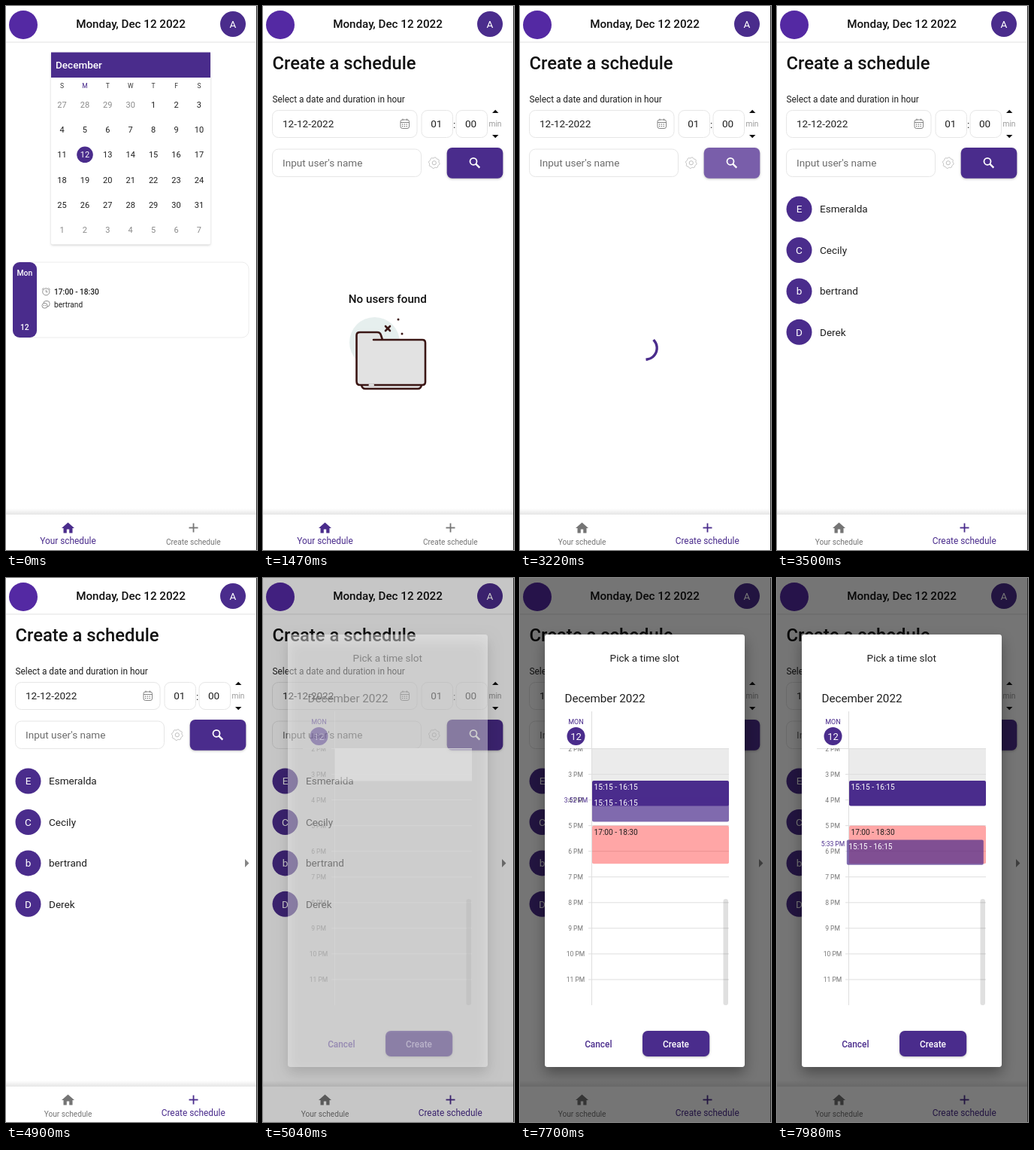
These frames come from a looping animation (334 px wide and 722 px high, 8 s). An HTML page with a canvas:

```html
<!DOCTYPE html>
<html lang="en">
<head>
<meta charset="utf-8">
<title>Schedule app</title>
<style>
html, body { margin: 0; width: 100%; height: 100%; overflow: hidden; background: #fff; }
canvas { display: block; width: 334px; height: 722px; }
</style>
</head>
<body>
<canvas id="stage"></canvas>
<script>
const W = 334, H = 722, LOOP = 8000, STEP = 70;
const PURPLE = '#4a2c8c', INK = '#1f1f1f', GREY = '#757575';
const canvas = document.getElementById('stage');
const dpr = window.devicePixelRatio || 1;
canvas.width = W * dpr;
canvas.height = H * dpr;
const c = canvas.getContext('2d');
c.scale(dpr, dpr);

const clamp = v => Math.max(0, Math.min(1, v));
const mix = (a, b, p) => a + (b - a) * p;
const mixRgb = (a, b, p) => `rgb(${a.map((v, i) => Math.round(mix(v, b[i], p))).join()})`;

// cubic-bezier(.4, 0, .2, 1)
function ease(x) {
  let lo = 0, hi = 1, s = 0.5;
  for (let i = 0; i < 20; i++) {
    s = (lo + hi) / 2;
    const bx = 1.2 * (1 - s) ** 2 * s + 0.6 * (1 - s) * s * s + s ** 3;
    if (bx < x) lo = s; else hi = s;
  }
  return 3 * (1 - s) * s * s + s ** 3;
}

// y is the middle of the capital letters
function text(s, x, y, size, color = INK, align = 'left', weight = 400) {
  c.font = `${weight} ${size}px Roboto, sans-serif`;
  c.textAlign = align;
  c.fillStyle = color;
  c.fillText(s, x, y + size * 0.355);
}
const label = (s, x, y, size, color, weight) => text(s, x, y, size, color, 'center', weight);

function rect(x, y, w, h, color) {
  c.fillStyle = color;
  c.fillRect(x, y, w, h);
}
function box(x, y, w, h, r, fill, stroke, lw = 1) {
  c.beginPath();
  c.roundRect(x, y, w, h, r);
  if (fill) { c.fillStyle = fill; c.fill(); }
  if (stroke) { c.strokeStyle = stroke; c.lineWidth = lw; c.stroke(); }
}
function disc(x, y, r, color) {
  c.beginPath();
  c.arc(x, y, r, 0, 7);
  c.fillStyle = color;
  c.fill();
}
function ring(x, y, r, color, lw = 1) {
  c.beginPath();
  c.arc(x, y, r, 0, 7);
  c.strokeStyle = color;
  c.lineWidth = lw;
  c.stroke();
}
function path(points, fill, stroke, lw = 1) {
  c.beginPath();
  for (let i = 0; i < points.length; i += 2) c.lineTo(points[i], points[i + 1]);
  if (fill) { c.closePath(); c.fillStyle = fill; c.fill(); }
  if (stroke) { c.strokeStyle = stroke; c.lineWidth = lw; c.stroke(); }
}
function shadowed(blur, dy, alpha, draw) {
  c.save();
  c.shadowColor = `rgba(0,0,0,${alpha})`;
  c.shadowBlur = blur * dpr;
  c.shadowOffsetY = dy * dpr;
  draw();
  c.restore();
}

function header() {
  rect(0, 0, W, 48, '#fff');
  rect(0, 47.5, W, 1, '#e2e2e2');
  disc(23, 25, 19, '#5429a3');
  label('Monday, Dec 12 2022', 166, 24, 15.2, '#111', 500);
  disc(302, 24, 17, PURPLE);
  label('A', 302, 24, 13.5, '#fff');
}

function nav(p) {
  const shade = c.createLinearGradient(0, 667, 0, 675);
  shade.addColorStop(0, 'rgba(0,0,0,0)');
  shade.addColorStop(1, 'rgba(0,0,0,.1)');
  rect(0, 667, W, 8, shade);
  rect(0, 675, W, 47, '#fff');
  const on = [74, 44, 140], off = [117, 117, 117];
  const home = mixRgb(on, off, p), add = mixRgb(off, on, p);
  path([82.5, 685.5, 91, 693, 88.5, 693, 88.5, 699.5, 84.2, 699.5, 84.2, 694.5,
    80.8, 694.5, 80.8, 699.5, 76.5, 699.5, 76.5, 693, 74, 693], home);
  rect(243.5, 691.6, 12, 1.8, add);
  rect(248.6, 686.5, 1.8, 12, add);
  label('Your schedule', 82.5, mix(710, 711, p), mix(11.85, 10.15, p), home);
  label('Create schedule', 249.2, mix(711, 710, p), mix(10.15, 11.85, p), add);
}

function calendar() {
  shadowed(3, 1, 0.2, () => box(60, 61.5, 212, 255, 2, '#fff'));
  rect(60, 61.5, 212, 33.5, PURPLE);
  text('December', 66, 78.5, 13.5, '#fff', 'left', 500);
  const colX = i => 74.5 + i * 30.4;
  [...'SMTWTFS'].forEach((d, i) => label(d, colX(i), 106, 8.5, i === 1 ? PURPLE : '#333'));
  disc(105, 197.3, 10.8, PURPLE);
  for (let i = 0; i < 42; i++) {
    const n = i - 3, inside = n > 0 && n < 32;
    const day = n < 1 ? n + 30 : n > 31 ? n - 31 : n;
    const color = inside ? (n === 12 ? '#fff' : INK) : '#8a8a8a';
    label(day, colX(i % 7), 131 + Math.floor(i / 7) * 33.25, 11, color);
  }
}

function homePage() {
  calendar();
  box(9.5, 340, 313.5, 100, 9, '#fff', '#ececec');
  box(9, 340, 32, 100, 9, PURPLE);
  label('Mon', 24.8, 354.5, 10.4, '#fff', 500);
  label('12', 24.8, 426, 10.4, '#fff', 500);
  ring(53.3, 379.3, 4.6, '#777', 0.8);
  path([53.3, 376.5, 53.3, 379.6, 55.5, 379.6], null, '#777', 0.8);
  path([47.8, 376.5, 50.2, 374.2], null, '#777', 0.8);
  path([56.4, 374.2, 58.8, 376.5], null, '#777', 0.8);
  text('17:00 - 18:30', 64, 379.3, 10.15, INK, 'left', 500);
  box(50, 391.5, 8, 7.5, 3, null, '#777', 0.8);
  box(48, 394.5, 7, 6.5, 3, '#fff', '#777', 0.8);
  disc(50.3, 397.4, 0.6, '#777');
  disc(52.8, 397.4, 0.6, '#777');
  text('bertrand', 64, 396.3, 10.15);
}

function gear(x, y) {
  c.beginPath();
  for (let i = 0; i <= 64; i++) {
    const a = i / 64 * Math.PI * 2, r = 6.4 + 0.9 * clamp(Math.sin(a * 8) * 2 + 0.5);
    c.lineTo(x + r * Math.cos(a), y + r * Math.sin(a));
  }
  c.strokeStyle = '#bdbdbd';
  c.lineWidth = 1;
  c.stroke();
  ring(x, y, 2.6, '#bdbdbd');
}

function form(glow) {
  const field = (x, y, w, h) => box(x, y, w, h, 8, '#fff', '#e6e6e6');
  text('Create a schedule', 12.5, 75.5, 23.8, '#111', 'left', 500);
  text('Select a date and duration in hour', 12.5, 124, 11.85);
  field(12.5, 138.5, 192.5, 36);
  field(211, 138.5, 41.5, 36);
  field(257, 138.5, 41.5, 36);
  text('12-12-2022', 26, 156, 13.54);
  label('01', 230.8, 156, 13.54);
  label(':', 254.7, 157, 13.54);
  label('00', 276.5, 156, 13.54);
  label('min', 309, 156.5, 10.15, '#999');
  path([305, 142, 309.2, 137.8, 313.4, 142], '#111');
  path([305, 171, 309.2, 175.2, 313.4, 171], '#111');
  box(183, 151, 11.5, 11.5, 2.5, null, '#777', 0.9);
  path([183, 154.5, 194.5, 154.5], null, '#777', 0.9);
  path([186, 149.6, 186, 152], null, '#777', 0.9);
  path([191.5, 149.6, 191.5, 152], null, '#777', 0.9);
  for (let i = 0; i < 6; i++) rect(185 + i % 3 * 2.8, 156.4 + (i > 2) * 2.6, 1.3, 1.3, '#777');
  field(12.5, 190, 198, 36.5);
  text("Input user's name", 26, 208, 13.54, '#6c6c6c');
  gear(227.8, 208.2);
  shadowed(3, 1, 0.25, () => box(244.7, 188, 74.6, 40.8, 7, mixRgb([74, 44, 140], [121, 94, 170], glow)));
  ring(280, 206.3, 4.5, '#fff', 1.8);
  path([283.3, 209.6, 288.3, 214.6], null, '#fff', 2.2);
}

function noUsers() {
  const line = '#3b1614', fill = '#e2e2e2';
  label('No users found', 165.8, 389, 15.2, '#111', 500);
  disc(148.5, 446.5, 33.5, '#e6efee');
  c.save();
  c.lineJoin = c.lineCap = 'round';
  c.beginPath();
  c.moveTo(131, 503);
  c.quadraticCurveTo(132, 508, 136, 508);
  c.lineTo(206, 508);
  c.quadraticCurveTo(210, 508, 211, 503);
  c.fillStyle = fill;
  c.fill();
  c.strokeStyle = line;
  c.lineWidth = 2.6;
  c.stroke();
  c.beginPath();
  c.moveTo(147, 443);
  c.lineTo(212, 443);
  c.quadraticCurveTo(216, 443, 216, 447);
  c.lineTo(216, 499);
  c.quadraticCurveTo(216, 503, 212, 503);
  c.lineTo(129, 503);
  c.quadraticCurveTo(124.5, 503, 124.5, 498);
  c.lineTo(124.5, 437);
  c.quadraticCurveTo(124.5, 433, 129, 433);
  c.lineTo(152, 433);
  c.quadraticCurveTo(156, 433, 157, 437);
  c.lineTo(159, 443);
  c.fill();
  c.stroke();
  path([142, 503, 146.5, 503], null, fill, 3);
  path([163, 425, 169, 431], null, line, 2.6);
  path([169, 425, 163, 431], null, line, 2.6);
  c.restore();
  disc(180, 416, 1.5, line);
  disc(185, 435, 1.5, line);
}

function spinner(ms) {
  const sweep = ease(clamp(ms / 666.5)) * 1.5 * Math.PI;
  const start = -Math.PI / 2 + ms / 2222 * 2 * Math.PI + ms / 1333 * Math.PI / 2;
  c.save();
  c.lineCap = 'square';
  c.beginPath();
  c.arc(167, 454, 15.2, start, start + Math.max(sweep, 0.001));
  c.strokeStyle = PURPLE;
  c.lineWidth = 3.4;
  c.stroke();
  c.restore();
}

function userList(arrow) {
  ['Esmeralda', 'Cecily', 'bertrand', 'Derek'].forEach((name, i) => {
    const y = 269.5 + i * 54.45;
    disc(29.5, y, 17, PURPLE);
    label(name[0], 29.5, y, 13.54, '#fff');
    text(name, 57, y, 13.54);
  });
  if (arrow) path([318, 373, 323.4, 378.5, 318, 384], '#858585');
}

const hourY = h => 226.5 + (h - 14) * 34.05;

function event(x, from, color, caption, ink) {
  const hours = caption.split(' - ').map(s => s.split(':')).map(([h, m]) => +h + m / 60);
  const top = hourY(from ?? hours[0]);
  box(x, top, 182, (hours[1] - hours[0]) * 34.05 - 0.6, 2, color);
  text(caption, x + 2.5, top + 8.8, 10.15, ink);
}

function timetable(events, drag) {
  c.save();
  c.beginPath();
  c.rect(50, 226, 235, 341);
  c.clip();
  rect(96, 226, 182, 43.5, '#ebebeb');
  for (let h = 14; h < 24; h++) {
    rect(91, hourY(h) - 0.5, 187, 1, '#dedede');
    label(h - 12 + ' PM', 74, hourY(h), 8.5, GREY);
  }
  if (events) {
    event(96, null, PURPLE, '15:15 - 16:15', '#fff');
    event(96, null, 'rgba(255,0,0,.35)', '17:00 - 18:30', INK);
  }
  box(270.5, 426, 6.5, 141, 3, 'rgba(0,0,0,.12)');
  if (drag >= 0) {
    const minutes = Math.round(mix(232, 333, drag)), at = 12 + minutes / 60;
    const clock = Math.floor(minutes / 60) + ':' + String(minutes % 60).padStart(2, '0');
    event(mix(96, 92.8, drag), at, 'rgba(74,44,140,.7)', '15:15 - 16:15', '#fff');
    label(clock + ' PM', 74.5, hourY(at) + 5.2, 8.5, PURPLE);
  }
  c.restore();
}

function dialog(alpha, events, drag) {
  c.save();
  c.globalAlpha = alpha;
  rect(0, 0, W, H, 'rgba(0,0,0,.54)');
  shadowed(18, 8, 0.35, () => box(33, 75, 266, 574, 3.4, '#fff'));
  label('Pick a time slot', 165.8, 106.5, 13.54);
  text('December 2022', 59.5, 159.5, 15.2);
  label('MON', 74.5, 191, 9, PURPLE);
  disc(74.5, 210, 12, PURPLE);
  label('12', 74.5, 210, 13, '#fff');
  rect(53, 226, 225, 1, '#dedede');
  rect(95, 177, 1, 390, '#dedede');
  timetable(events, drag);
  label('Cancel', 104.3, 618.3, 11.85, PURPLE, 500);
  shadowed(3, 1, 0.25, () => box(163, 601, 89.2, 34, 7, PURPLE));
  label('Create', 207.5, 618.3, 11.85, '#fff', 500);
  c.restore();
}

function draw(t) {
  rect(0, 0, W, H, '#fff');
  header();
  if (t < 1470) {
    homePage();
  } else {
    form(Math.min(clamp((t - 2870) / 280), clamp((3500 - t) / 210)));
    if (t < 3010) noUsers();
    else if (t < 3500) spinner(t - 3000);
    else userList(t >= 4900);
  }
  nav(clamp((t - 1470) / 210));
  if (t >= 5040) {
    const open = 1 - (1 - clamp((t - 5005) / 150)) ** 2;
    dialog(open, t >= 5320, t < 7700 ? -1 : (t - 7700) / 280);
  }
  rect(333, 0, 1, H, '#2b2b2b');
}

const begin = performance.now();
function tick() {
  const t = (performance.now() - begin) % LOOP;
  draw(Math.floor(t / STEP) * STEP);
  requestAnimationFrame(tick);
}
tick();
</script>
</body>
</html>
```
